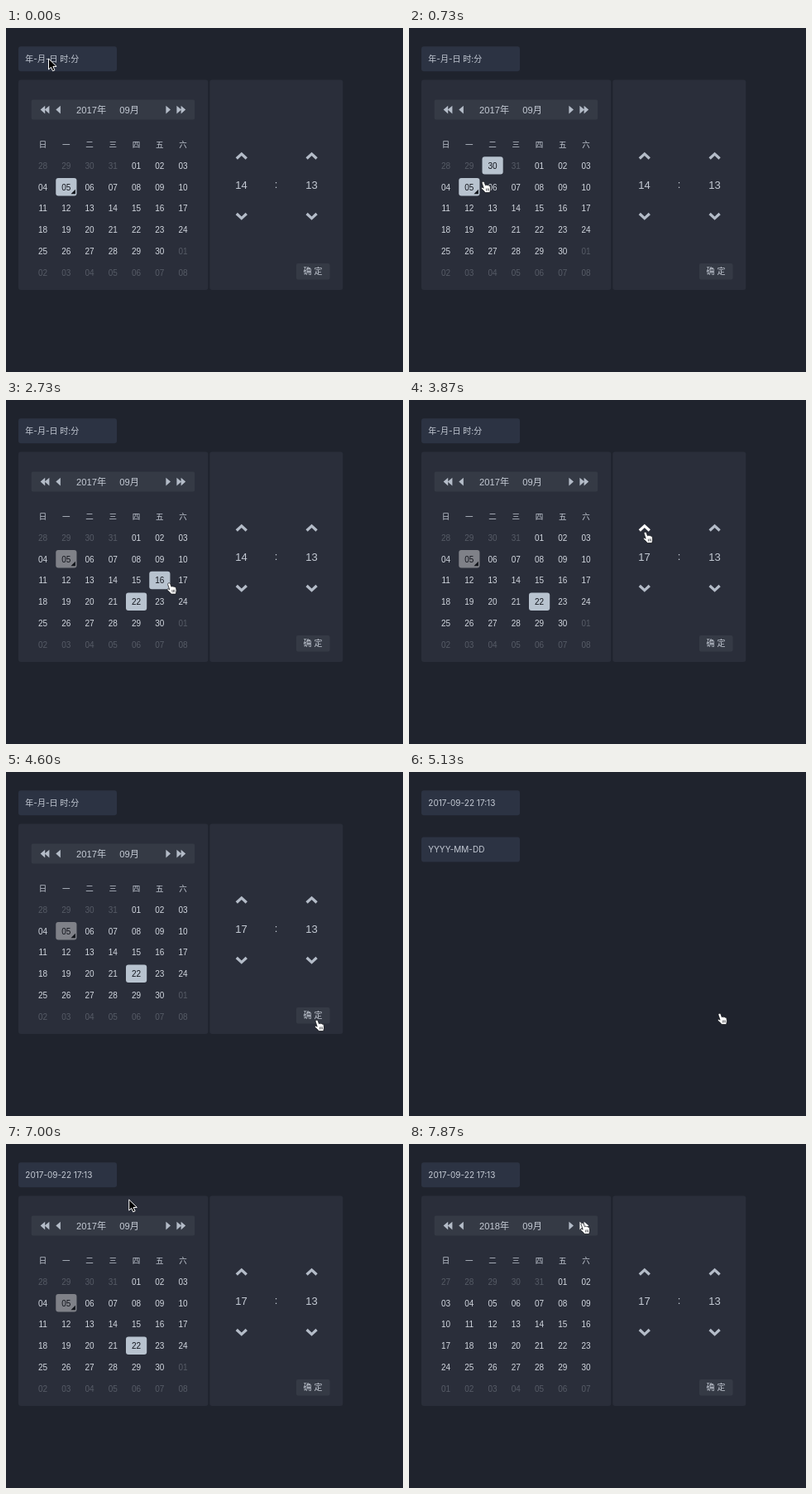
Animation, 480 px wide and 415 px high, one loop 8000 ms. Source, as an HTML page:

```html
<!DOCTYPE html>
<html lang="zh-CN">
<head>
<meta charset="utf-8">
<title>Date and time picker</title>
<style>
  html, body { margin: 0; width: 100%; height: 100%; overflow: hidden; background: #1f232d; }
  svg { display: block; width: 480px; height: 415px; }
  text { font-family: "Liberation Sans", "Noto Sans CJK SC", "Noto Sans CJK", sans-serif; fill: #c5cbd5; }
  .field { font-family: Inter, "Noto Sans CJK SC", "Noto Sans CJK", sans-serif; font-size: 10px; }
</style>
</head>
<body>
<svg id="stage" viewBox="0 0 480 415"></svg>
<script>
const TICK = 8000 / 120, LOOP = 120;
const ICON = '#b4bcc8', LIT = '#b8c3cf', TODAY = '#7f8188', BAR = '#353a45';
const COL = 28.25, ROW = 25.8, LEFT = 44.6, TOP = 166;
const stage = document.getElementById('stage');

function add(parent, tag, attrs, content) {
  const el = document.createElementNS('http://www.w3.org/2000/svg', tag);
  set(el, attrs);
  if (content !== undefined) el.textContent = content;
  parent.appendChild(el);
  return el;
}
function set(el, attrs) {
  for (const name in attrs) el.setAttribute(name, attrs[name]);
}
const box = (parent, x, y, width, height, fill, rx = 3) =>
  add(parent, 'rect', { x, y, width, height, fill, rx });
const label = (parent, x, y, size, content, anchor = 'middle') =>
  add(parent, 'text', { x, y, 'font-size': size, 'text-anchor': anchor }, content);
const show = (el, on) => el.setAttribute('visibility', on ? 'visible' : 'hidden');

function field(parent, y, content) {
  box(parent, 15, y, 119, 30, '#2c3343');
  return add(parent, 'text', { x: 23.3, y: y + 18.6, class: 'field' }, content);
}

const value = field(stage, 22.3, '');
const secondField = add(stage, 'g', {});
field(secondField, 78.6, 'YYYY-MM-DD');

const panel = add(stage, 'g', {});
box(panel, 15, 62.5, 229.3, 253.5, '#2a2e3a');
box(panel, 246.3, 62.5, 161, 253.5, '#2a2e3a');
box(panel, 30.7, 86.5, 197.5, 24, BAR, 2);
const year = label(panel, 85, 102.6, 11.2, '', 'start');
label(panel, 137.2, 102.6, 11.2, '09月', 'start');

// Controls change colour under the pointer: hit area is [x, y, w, h].
const controls = [];
function control(el, prop, base, lit, hit) {
  controls.push({ el, prop, base, lit, hit });
}
function triangles(tips, dir) {
  const d = tips.map(x => `M${x} 98.6l${5.6 * dir} -4.8v9.6z`).join('');
  const x = Math.min(...tips) - (dir < 0 ? 7 : 2);
  control(add(panel, 'path', { d }), 'fill', ICON, '#fff', [x, 90, tips.length * 5 + 4, 17]);
}
triangles([41.6, 46.8], 1);
triangles([60.3], 1);
triangles([199, ], -1);
triangles([212, 217.2], -1);

function chevron(x, y, dir) {
  const el = add(panel, 'path', {
    d: `M${x - 6} ${y + 3 * dir}l6 ${-5.6 * dir}l6 ${5.6 * dir}`,
    fill: 'none', 'stroke-width': 3.3
  });
  control(el, 'stroke', ICON, '#fff', [x - 9, y - 8, 18, 16]);
}
for (const x of [284.8, 369.6]) {
  chevron(x, 154.5, 1);
  chevron(x, 227, -1);
}
const hour = label(panel, 284.6, 193.8, 13, '');
label(panel, 326.6, 193.3, 13, ':');
label(panel, 369.4, 193.8, 13, '13');

control(box(panel, 351, 284, 40.5, 19.5, BAR, 2), 'fill', BAR, '#454b58', [351, 284, 40, 20]);
label(panel, 371, 297.4, 10, '确 定');

[...'日一二三四五六'].forEach((name, i) => label(panel, LEFT + i * COL, 143.7, 9.5, name));

const cells = Array.from({ length: 42 }, (_, i) => {
  const x = LEFT + (i % 7) * COL, y = TOP + Math.floor(i / 7) * ROW;
  return {
    back: box(panel, x - 12.6, y - 10.8, 25.2, 21.4, LIT),
    tick: add(panel, 'path', { d: `M${x + 11} ${y + 3}v5.4h-5.4z`, fill: '#11141a' }),
    text: label(panel, x, y + 3.7, 10, '')
  };
});

const arrow = add(stage, 'path', {
  d: 'M.5 0V13l3-2.7 2 4.5 2.4-1-2-4.4h4.2z', fill: '#000', stroke: '#fff', 'stroke-width': 1
});
const hand = add(stage, 'g', {});
add(hand, 'path', {
  d: 'M2 .4C3 0 3.8.4 4.2 1.3L5.5 4.8C6.1 4 7.2 4.1 7.6 4.8C8.2 4.3 9.2 4.5 9.4 5.2' +
     'C10.2 5 11 5.4 11.1 6.1L11.6 9C11.7 10.6 11 11.6 10.8 13.6H5.2C4.1 11.6 2 10.4.7 9' +
     'C-.1 8 .9 6.9 2 7.5L3.2 8.2 1.2 2.2C.9 1.4 1.3.7 2 .4Z',
  fill: '#fff', stroke: '#15171c', 'stroke-width': .8
});
add(hand, 'path', { d: 'M6.2 8.6l.5 3M7.8 8.4l.4 3M9.3 8.3l.2 3', stroke: '#15171c', 'stroke-width': .6 });

// Pointer stops: [tick, x, y, is hand]
const stops = [
  [0, 51, 37, 0], [3, 51, 37, 0], [9, 88, 132, 1], [10, 92, 162, 1], [11, 87, 185, 1],
  [16, 97, 200, 1], [24, 97, 200, 1], [26, 150, 232, 1], [27, 152, 233, 1], [36, 162, 241, 1],
  [38, 162, 241, 1], [44, 227, 200, 0], [48, 282, 160, 1], [49, 283, 159, 1], [58, 283, 159, 1],
  [59, 287, 168, 0], [67, 368, 311, 0], [69, 373, 299, 1], [71, 372, 291, 1], [78, 373, 291, 0],
  [81, 374, 291, 0], [92, 92, 42, 1], [94, 79, 32, 1], [99, 79, 32, 1], [100, 86, 36, 0],
  [109, 198, 92, 1], [111, 206, 96, 1], [113, 207, 95, 1], [LOOP, 207, 95, 1]
];
function pointerAt(tick) {
  const i = Math.max(0, stops.findIndex(s => s[0] > tick) - 1);
  const [t0, x0, y0, isHand] = stops[i], [t1, x1, y1] = stops[i + 1];
  const k = (tick - t0) / (t1 - t0);
  return { x: x0 + (x1 - x0) * k, y: y0 + (y1 - y0) * k, isHand };
}

function drawMonth(yearNo, selected, today, hovered) {
  // The grid starts on Monday, although its header starts with 日.
  const lead = new Date(yearNo, 8, 1).getDay() - 1;
  cells.forEach(({ back, tick, text }, i) => {
    const date = new Date(yearNo, 8, 1 - lead + i);
    const inMonth = date.getMonth() === 8;
    const day = inMonth ? date.getDate() : 0;
    const lit = i === hovered || (day && day === selected);
    const isToday = day && day === today;
    text.textContent = String(date.getDate()).padStart(2, '0');
    text.style.fill = lit || isToday ? '#12151c' : inMonth ? '#d3d8e0' : '#565b66';
    back.setAttribute('fill', lit ? LIT : TODAY);
    show(back, lit || isToday);
    show(tick, isToday);
  });
}

function render(ms) {
  const tick = Math.floor((ms % 8000 + 5) / TICK) % LOOP;
  const open = tick < 75 || tick >= 99;
  const next = tick >= 118;
  const pointer = pointerAt(tick);

  value.textContent = tick < 75 ? '年-月-日 时:分' : '2017-09-22 17:13';
  show(secondField, !open);
  panel.setAttribute('display', open ? 'inline' : 'none');

  if (open) {
    // Hover follows the pointer one tick late.
    const { x, y } = pointerAt(Math.max(0, tick - 1));
    const hx = x + 2, hy = y + 1;
    const col = Math.floor((hx - LEFT) / COL + .5), row = Math.floor((hy - TOP) / ROW + .5);
    const inGrid = col >= 0 && col < 7 && row >= 0 && row < 6;
    const selected = next ? 0 : tick < 20 ? 5 : tick < 34 ? 6 : 22;

    year.textContent = (next ? 2018 : 2017) + '年';
    hour.textContent = 14 + [52, 55, 58].filter(t => tick >= t).length;
    drawMonth(next ? 2018 : 2017, selected, next ? 0 : 5, inGrid ? row * 7 + col : -1);
    for (const { el, prop, base, lit, hit: [left, top, w, h] } of controls) {
      const over = hx >= left && hx <= left + w && hy >= top && hy <= top + h;
      el.setAttribute(prop, over ? lit : base);
    }
  }

  const transform = `translate(${pointer.x} ${pointer.y})`;
  set(arrow, { transform });
  set(hand, { transform });
  show(arrow, !pointer.isHand);
  show(hand, pointer.isHand);
}

const start = performance.now();
function loop() {
  render(performance.now() - start);
  requestAnimationFrame(loop);
}
loop();
</script>
</body>
</html>
```
